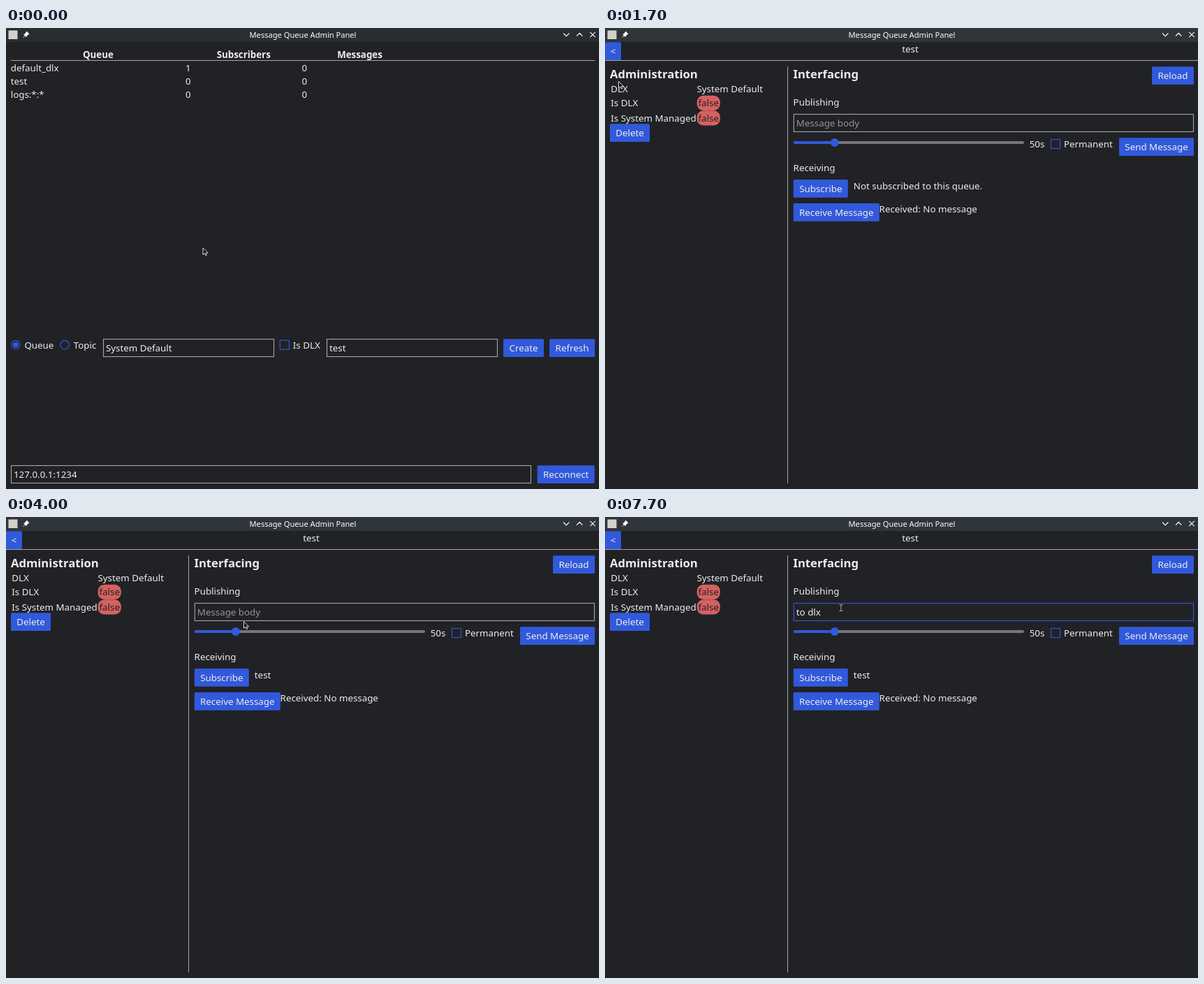
Animation of 849 by 660 pixels, one loop 8 s. Source, as an HTML page with a canvas:

```html
<!DOCTYPE html>
<html lang="en">
<head>
<meta charset="utf-8">
<title>Message Queue Admin Panel</title>
<style>
html, body { margin: 0; width: 100%; height: 100%; overflow: hidden; background: #212225; }
canvas { display: block; }
</style>
</head>
<body>
<canvas width="849" height="660"></canvas>
<script>
const ctx = document.querySelector('canvas').getContext('2d');
const LOOP = 8000, STEP = 100, OPEN = 1700, SUBSCRIBED = 3700, FOCUS = 4700;
const BG = '#212225', FG = '#ededed', BLUE = '#3159db', HOVER = '#6180e3', LINE = '#a6a6a6';

// Pointer moves: start, end, target x, target y
const MOVES = [
  [0, 600, 16, 57], [600, 800, 17, 67.5], [800, 900, 19, 76],
  [2100, 2800, 320, 237],
  [3800, 4000, 340, 149.3], [4000, 4200, 341, 108], [4200, 4600, 338, 130]
];
const MESSAGE = 'to dlx';
const KEY_TIMES = [6100, 6300, 6700, 7000, 7100, 7200];

// Each move eases in and out along a curve that goes sideways first
function pointerAt(t) {
  return MOVES.reduce(([x, y], [start, end, tx, ty]) => {
    const u = Math.min(1, Math.max(0, (t - start) / (end - start)));
    const k = u * u * (3 - 2 * u);
    return [x + (tx - x) * k * (2 - k), y + (ty - y) * k * k];
  }, [281.5, 314.5]);
}

const inside = ([px, py], x, y, w, h) => px >= x && px < x + w && py >= y && py < y + h;

function rect(x, y, w, h, color) {
  ctx.fillStyle = color;
  ctx.fillRect(x, y, w, h);
}

function rounded(x, y, w, h, r, color) {
  ctx.fillStyle = color;
  ctx.beginPath();
  ctx.roundRect(x, y, w, h, r);
  ctx.fill();
}

function dot(x, y, r, color) {
  ctx.fillStyle = color;
  ctx.beginPath();
  ctx.arc(x, y, r, 0, 7);
  ctx.fill();
}

function text(str, x, y, { size = 13.333, bold = false, color = FG, align = 'left' } = {}) {
  ctx.font = `${bold ? 'bold ' : ''}${size}px "Noto Sans", sans-serif`;
  ctx.textAlign = align;
  ctx.fillStyle = color;
  ctx.fillText(str, x, y);
}

function strokePath(d, color, width = 1) {
  ctx.strokeStyle = color;
  ctx.lineWidth = width;
  ctx.stroke(new Path2D(d));
}

function frame(x, y, w, h, color) {
  ctx.strokeStyle = color;
  ctx.lineWidth = 1.1;
  ctx.strokeRect(x + .5, y + .5, w - 1, h - 1);
}

function button(label, x, y, w, mouse) {
  rounded(x, y, w, 25.8, 1.5, inside(mouse, x, y, w, 26) ? HOVER : BLUE);
  text(label, x + w / 2, y + 17.9, { align: 'center' });
}

function field(content, x, y, w, { border = LINE, color = FG } = {}) {
  frame(x, y, w, 26, border);
  text(content, x + 4, y + 18, { color });
}

function checkbox(label, x, y) {
  frame(x, y, 14, 14, BLUE);
  text(label, x + 19, y + 12);
}

function radio(label, x, y, checked) {
  ctx.strokeStyle = BLUE;
  ctx.lineWidth = 1.2;
  ctx.beginPath();
  ctx.arc(x, y, 6.3, 0, 7);
  ctx.stroke();
  if (checked) dot(x, y, 4, BLUE);
  text(label, x + 12.6, y + 5);
}

function titleBar(color) {
  rect(0, 0, 849, 20, color);
  rect(3.5, 3.5, 13, 12.5, '#d3d1cc');
  ctx.fillStyle = '#fcfcfc';
  ctx.fill(new Path2D('M29.5 4.5 33.5 8.5 32 9.3 29.8 11.6 29.3 13.2 25 9 26.6 8.4 28.8 6.1Z'));
  strokePath('M27.4 10.8 24.8 13.4', '#fcfcfc');
  text('Message Queue Admin Panel', 425, 13.5, { size: 11.111, color: '#fcfcfc', align: 'center' });
  strokePath('M798 7.5 802.2 11.7 806.4 7.5M817 11.5 821.2 7.3 825.4 11.5M836.3 5.8 843.7 13.2M843.7 5.8 836.3 13.2', '#fcfcfc', 1.1);
}

function listPage(mouse) {
  const rows = [['default_dlx', 1], ['test', 0], ['logs:*:*', 0]];
  const head = { bold: true, align: 'center' }, right = { align: 'right' };
  text('Queue', 131.9, 42.8, head);
  text('Subscribers', 340.2, 42.8, head);
  text('Messages', 506.5, 42.8, head);
  rect(7, 46, 836, 1, LINE);
  rows.forEach(([name, subscribers], i) => {
    const y = 61.6 + 19 * i;
    if (inside(mouse, 7, y - 12.6, 583, 17)) rect(7, y - 13.6, 583, 18.5, '#2d2e32');
    text(name, 6.7, y);
    text(subscribers, 264.6, y, right);
    text(0, 431.2, y, right);
  });
  radio('Queue', 13.8, 453.7, true);
  radio('Topic', 84.2, 453.7, false);
  field('System Default', 139, 445, 245);
  checkbox('Is DLX', 391.8, 446.7);
  field('test', 459, 445, 245);
  button('Create', 712, 445.2, 58, mouse);
  button('Refresh', 778, 445.2, 65, mouse);
  field('127.0.0.1:1234', 7, 626, 745);
  button('Reconnect', 760.7, 626.2, 82, mouse);
}

function falsePill(y) {
  rounded(131.6, y, 33.2, 21.2, 9, '#d56260');
  text('false', 133.5, y + 15.2, { color: BG });
}

function messageField(t, mouse) {
  const typed = KEY_TIMES.filter(time => time <= t).length;
  const body = MESSAGE.slice(0, typed);
  const active = t >= FOCUS || inside(mouse, 270, 123, 573, 26);
  field(body || 'Message body', 269.8, 123, 573.2, { border: active ? BLUE : LINE, color: body ? FG : '#949494' });
  const lastInput = typed ? KEY_TIMES[typed - 1] : FOCUS;
  if (t >= FOCUS && (t - lastInput) % 1000 < 500) {
    rect(274 + ctx.measureText(body).width, 127, 1, 18, FG);
  }
}

function queuePage(t, mouse) {
  const heading = { size: 16.667, bold: true };
  button('<', 0, 20.2, 23, mouse);
  text('test', 437, 35, { align: 'center' });
  rect(0, 46, 849, 1, LINE);
  rect(261, 55, 1, 597, LINE);

  text('Administration', 6.9, 72, heading);
  text('DLX', 8.3, 92.2);
  text('System Default', 131.5, 92.2);
  text('Is DLX', 8.3, 112.2);
  falsePill(96.8);
  text('Is System Managed', 8.3, 133.8);
  falsePill(118.3);
  button('Delete', 7, 137.2, 57, mouse);

  text('Interfacing', 269.4, 72, heading);
  button('Reload', 783, 55.3, 60, mouse);
  text('Publishing', 269.6, 111);
  messageField(t, mouse);
  rounded(270, 162, 330, 4, 2, '#777');
  rounded(270, 162, 59, 4, 2, BLUE);
  dot(328.8, 164, 6, BLUE);
  text('50s', 607.7, 171);
  checkbox('Permanent', 638, 159);
  button('Send Message', 736, 157.2, 107, mouse);

  text('Receiving', 269.6, 205);
  button('Subscribe', 269.8, 216.9, 78, mouse);
  text(t < SUBSCRIBED ? 'Not subscribed to this queue.' : 'test', 355.8, 230.5);
  button('Receive Message', 269.8, 250.9, 123, mouse);
  text('Received: No message', 392.6, 264.4);
}

const SHAPES = {
  arrow: 'M.5 .5V9.9L2.8 8 4.4 11.2 5.9 10.5 4.4 7.5H7.6Z',
  hand: 'M-.9 .6Q0-.4 .9 .6V4L5 4.9Q6 5.3 5.8 7L4.8 11H-.5L-3 7.2Q-2.6 5.8-.9 7Z',
  beam: 'M-2.5-4.5H-.8L0-4 .8-4.5H2.5M0-4V4M-2.5 4.5H-.8L0 4 .8 4.5H2.5'
};

function pointer(kind, [x, y]) {
  ctx.save();
  ctx.translate(x, y);
  if (kind === 'beam') {
    strokePath(SHAPES.beam, '#111', 2.2);
    strokePath(SHAPES.beam, '#c8c8c8', 1);
  } else {
    ctx.fillStyle = '#0c0c0c';
    ctx.fill(new Path2D(SHAPES[kind]));
    strokePath(SHAPES[kind], '#f4f4f4', .9);
  }
  ctx.restore();
}

function draw() {
  const t = Math.floor(performance.now() % LOOP / STEP) * STEP;
  const mouse = pointerAt(t);
  const opened = t >= OPEN;
  let kind = 'arrow';
  rect(0, 0, 849, 660, BG);
  titleBar(opened ? '#30353a' : '#2a2e32');
  if (opened) {
    queuePage(t, mouse);
    if (inside(mouse, 270, 123, 573, 26)) kind = 'beam';
    if (inside(mouse, 270, 217, 78, 26)) kind = 'hand';
  } else {
    listPage(mouse);
  }
  pointer(kind, mouse);
  requestAnimationFrame(draw);
}
draw();
</script>
</body>
</html>
```
